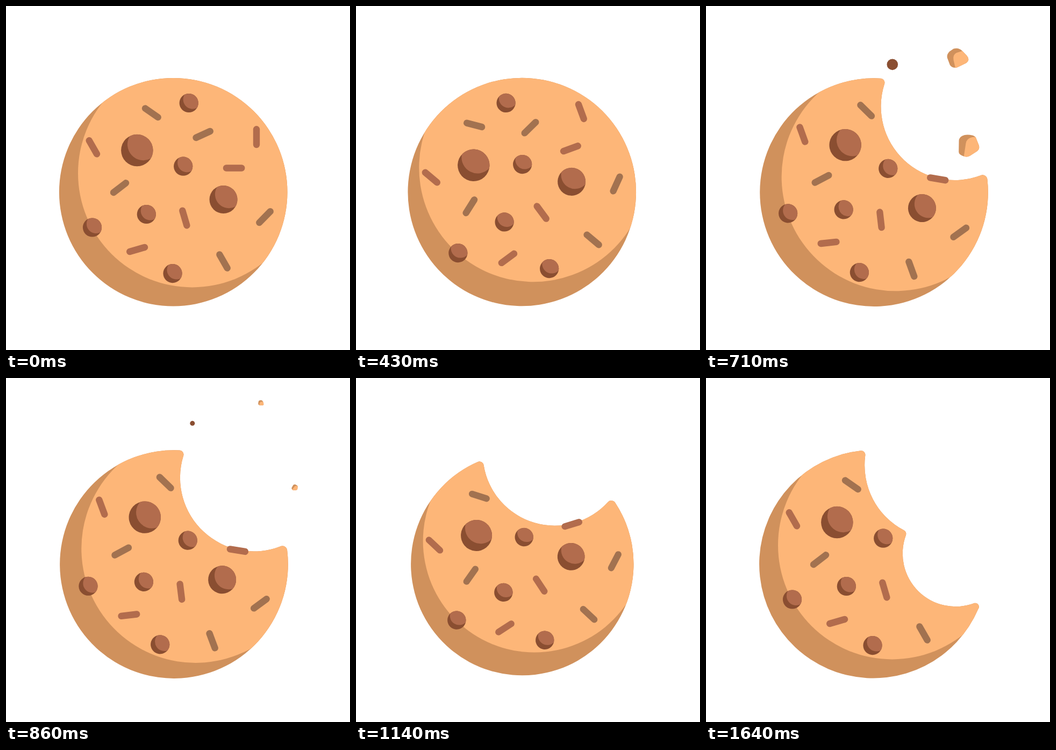
Animation, 640 px wide and 640 px high, one loop 1.78 s. Source, as an HTML page:

```html
<!DOCTYPE html>
<html lang="en">
<head>
<meta charset="utf-8">
<title>Cookie</title>
<style>
html, body { margin: 0; width: 100%; height: 100%; overflow: hidden; background: #fff; }
svg { display: block; width: 100vw; height: 100vh; }
</style>
</head>
<body>
<svg viewBox="0 0 640 640">
  <defs><clipPath id="edge"><path id="edgePath"/></clipPath></defs>
  <g id="cookie">
    <path id="body" fill="#d0915c"/>
    <g clip-path="url(#edge)"><circle cx="346.4" cy="311" r="212.4" fill="#fdb678"/></g>
    <g id="toppings"></g>
  </g>
  <g id="crumbs"></g>
</svg>
<script>
const LOOP = 1780, FPS = 14;
const PIVOT = [309.4, 353];
const BITES = [8, 17];          // ticks at which a piece goes missing
const DARK = '#8a4e31', RED = '#b26c4d', GREY = '#a27250';
const $ = id => document.getElementById(id);

function add(parent, tag, attrs) {
  const el = document.createElementNS('http://www.w3.org/2000/svg', tag);
  for (const name in attrs) el.setAttribute(name, attrs[name]);
  return parent.appendChild(el);
}

const tip = 'M288 135.2A8 8 0 0 1 296.2 145A137 137 0 0 0 ';
const rim = 'A212.3 212.3 0 1 1 288 135.2Z';
const OUTLINES = [
  'M98.9 346.2a212.3 212.3 0 1 1 424.6 0a212.3 212.3 0 1 1 -424.6 0Z',
  tip + '502.5 280.8A9 9 0 0 1 515.2 286.8' + rim,
  tip + '368.6 283.6A8 8 0 0 1 371.9 292.6A98.6 98.6 0 0 0 499.5 418.8A7 7 0 0 1 506.6 429.6' + rim
];

// x1, y1, x2, y2, colour, last bite count at which it is still there
const SPRINKLES = [
  [259, 190.5, 282.7, 207, GREY, 2], [353.5, 245, 379.8, 233, GREY, 0],
  [466, 229.3, 466, 258, RED, 0], [409.9, 301.5, 438.3, 301.5, RED, 1],
  [154.7, 250.3, 169, 275.3, RED, 2], [200, 347, 223, 329.3, GREY, 2],
  [328.3, 380.7, 336.4, 408.3, RED, 2], [230.2, 457, 258, 449, RED, 2],
  [471.3, 403, 491.7, 382.2, GREY, 1], [397.3, 462.5, 411.7, 487.6, GREY, 2]
];
// x, y, radius, last bite count
const CHIPS = [
  [340.2, 180.5, 17.6, 0], [243.8, 268.6, 29.7, 2], [329.7, 298.2, 17.6, 2],
  [404.5, 360, 26, 1], [261.3, 387.5, 17.6, 2], [160.5, 412, 17.6, 2], [310, 497.6, 17.6, 2]
];

// overlap of a circle with a copy of itself moved up and right
function lens(x, y, r) {
  const ox = .4 * r, oy = -.375 * r, d = Math.hypot(ox, oy);
  const h = Math.sqrt(r * r - d * d / 4) / d;
  const mx = x + ox / 2, my = y + oy / 2, nx = -oy * h, ny = ox * h;
  const arc = `A${r} ${r} 0 0 1 `;
  return `M${mx - nx} ${my - ny}${arc}${mx + nx} ${my + ny}${arc}${mx - nx} ${my - ny}Z`;
}

const toppings = [];
for (const [x1, y1, x2, y2, stroke, last] of SPRINKLES) {
  const el = add($('toppings'), 'line', { x1, y1, x2, y2, stroke, 'stroke-width': 12.4, 'stroke-linecap': 'round' });
  toppings.push({ el, last });
}
for (const [cx, cy, r, last] of CHIPS) {
  const el = add($('toppings'), 'g', {});
  add(el, 'circle', { cx, cy, r, fill: DARK });
  add(el, 'path', { d: lens(cx, cy, r), fill: RED });
  toppings.push({ el, last });
}

function crumb(shade, face, x, y, dx, dy) {
  const el = add($('crumbs'), 'g', {});
  add(el, 'path', { d: shade, fill: '#d0915c' });
  add(el, 'path', { d: face, fill: '#fdb678' });
  return { el, x, y, dx, dy };
}
const crumbs = [
  crumb('M-16-21Q-5-28 7-21L21-12Q32-4 24 6L5 22Q-6 29-15 21L-26 5Q-30-3-24-12Z',
    'M7-21L21-12Q32-4 24 6L5 22Q2 24 0 24.6L-9 7Q-15-6-6-13Z', 463.7, 135, 11, -91),
  crumb('M-21-21Q-14-28 4-28.5Q11-28.5 15-22L25-8Q30 0 25 7L10 23Q5 29-5 28.5Q-19 28-20.5 20L-26.5-6Q-29-14-21-21Z',
    'M12-26Q-2-23-6-15Q-9-10-8-4L-5 28.5Q5 29 10 23L25 7Q30 0 25-8L15-22Q13.5-25 12-26Z', 452, 302, 88, -101)
];
const bit = add($('crumbs'), 'circle', { cx: 346.8, fill: DARK });

const clamp = u => Math.min(1, Math.max(0, u));
const inOut = u => u < .5 ? 4 * u ** 3 : 1 - 4 * (1 - u) ** 3;
const sine = u => (1 - Math.cos(Math.PI * u)) / 2;
const quartIn = u => u ** 4;

// start tick, end tick, from angle, to angle, easing
const TURNS = [
  [3, 6, 0, -20.1, inOut], [6, 10, -20.1, 9.8, inOut],
  [10, 15.37, 9.8, -18, quartIn], [15.37, 18, -18, 0, inOut]
];
function angleAt(k) {
  const turn = TURNS.find(t => k < t[1]);
  if (!turn) return 0;
  const [a, b, from, to, ease] = turn;
  return from + (to - from) * ease(clamp((k - a) / (b - a)));
}
const squeeze = (k, bite) => .0277 * Math.sin(Math.PI * clamp((k - bite + 2) / 3));

function drawCrumbs(s) {
  const shown = s >= -1 && s < 4;
  $('crumbs').style.display = shown ? '' : 'none';
  if (!shown) return;
  const e = sine(clamp((s + 1) / 4.5));
  const size = Math.min(1.1, Math.max(0, 1 - .265 * s));
  for (const c of crumbs) {
    c.el.setAttribute('transform',
      `translate(${c.x + c.dx * e} ${c.y + c.dy * e}) rotate(${14 * s}) scale(${size})`);
  }
  bit.setAttribute('cy', 127 - 44 * e);
  bit.setAttribute('r', 12.8 * Math.min(1, (1 - s / 4) ** .75));
}

function draw(ms) {
  const k = Math.floor((ms % LOOP) * FPS / 1000 + .07);
  const eaten = BITES.filter(b => k >= b).length;
  const scale = 1 - squeeze(k, BITES[0]) - squeeze(k, BITES[1]);
  const [px, py] = PIVOT;
  $('cookie').setAttribute('transform',
    `translate(${px} ${py}) rotate(${angleAt(k)}) scale(${scale}) translate(${-px} ${-py})`);
  $('body').setAttribute('d', OUTLINES[eaten]);
  $('edgePath').setAttribute('d', OUTLINES[eaten]);
  for (const t of toppings) t.el.style.display = eaten <= t.last ? '' : 'none';
  drawCrumbs(eaten ? k - BITES[eaten - 1] - 1 : -9);
}

let start;
function tick(now) {
  if (start === undefined) start = now;
  draw(Math.max(0, now - start));
  requestAnimationFrame(tick);
}
draw(0);
requestAnimationFrame(tick);
</script>
</body>
</html>
```
